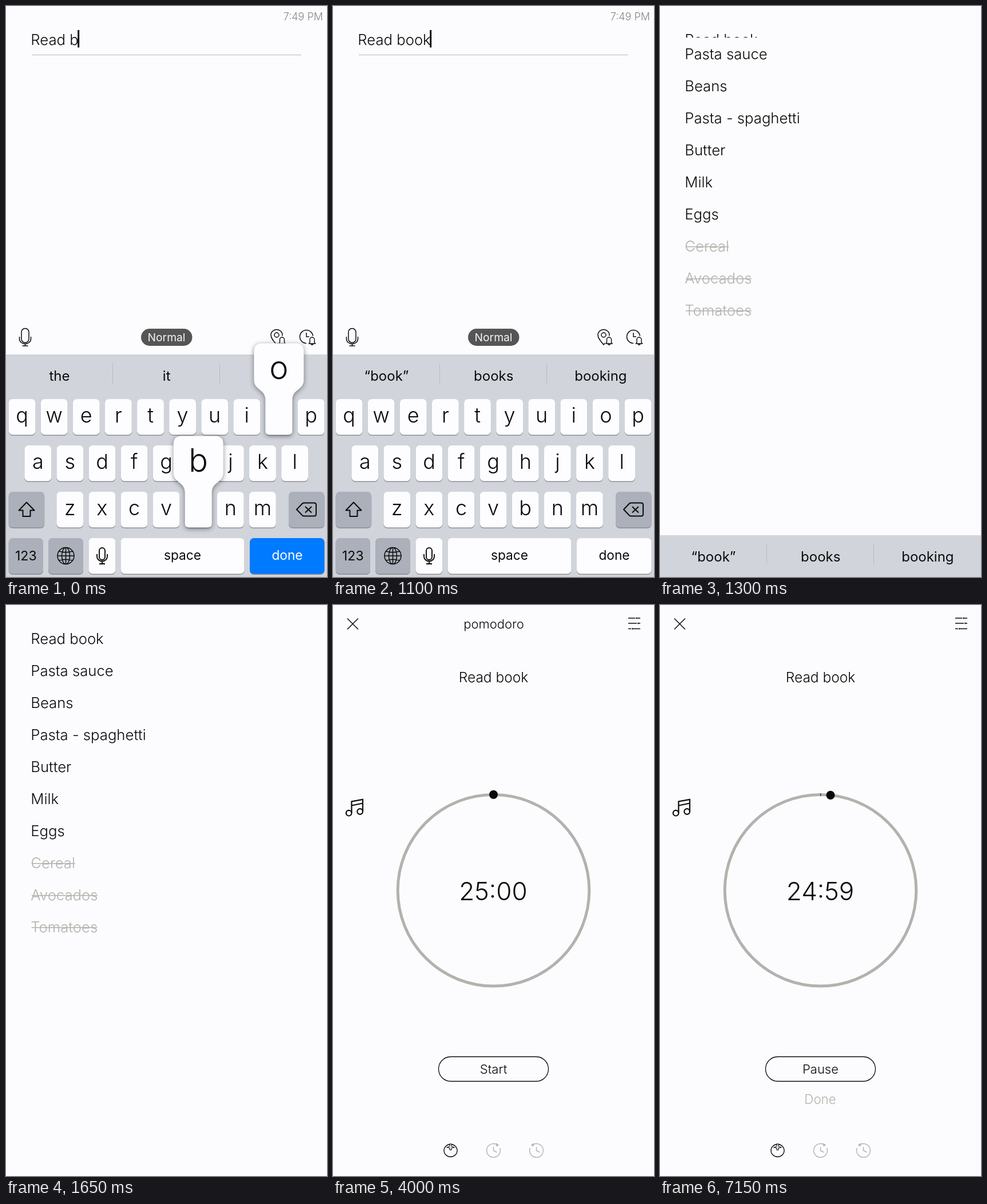
Write an HTML page with a canvas that moves like this. It is 561 px wide and 998 px high and loops after 7200 ms.

```html
<!DOCTYPE html>
<html lang="en">
<head>
<meta charset="utf-8">
<title>To-do list with timer</title>
<style>
  html, body { margin: 0; width: 100%; height: 100%; overflow: hidden; background: #fcfcfe; }
  canvas { display: block; }
</style>
</head>
<body>
<canvas id="stage" width="561" height="998"></canvas>
<script>
const ctx = document.getElementById('stage').getContext('2d');
const W = 561, H = 998, LOOP = 7200, STEP = 50;
const PAPER = '#fcfcfe', INK = '#0a0a0a', GREY = '#b2b2ae';

const clamp = v => Math.max(0, Math.min(1, v));
// Critically damped spring from 0 to 1.
const spring = (ms, rate) => {
  const x = Math.max(0, ms) / 1000 * rate;
  return 1 - Math.exp(-x) * (1 + x);
};

function text(str, x, y, size, { color = INK, weight = 300, align = 'center' } = {}) {
  ctx.font = `${weight} ${size}px Inter, sans-serif`;
  ctx.textAlign = align;
  ctx.fillStyle = color;
  ctx.fillText(str, x, y);
  return ctx.measureText(str).width;
}

function stroke(d, width = 1.5, color = INK, fill) {
  const path = new Path2D(d);
  if (fill) { ctx.fillStyle = fill; ctx.fill(path); }
  ctx.lineWidth = width;
  ctx.strokeStyle = color;
  ctx.stroke(path);
}

function box(x, y, w, h, r, fill) {
  ctx.beginPath();
  ctx.roundRect(x, y, w, h, r);
  ctx.fillStyle = fill;
  ctx.fill();
}

function at(x, y, draw) {
  ctx.save();
  ctx.translate(x, y);
  draw();
  ctx.restore();
}

function disc(x, y, r, color = INK) {
  ctx.beginPath();
  ctx.arc(x, y, r, 0, 2 * Math.PI);
  ctx.fillStyle = color;
  ctx.fill();
}

// ---- List ----
const items = ['Pasta sauce', 'Beans', 'Pasta - spaghetti', 'Butter', 'Milk', 'Eggs',
               'Cereal', 'Avocados', 'Tomatoes'];
const LEFT = 43.3, ROW = 56, FIRST_BASE = 68;
const itemText = (str, y, color = INK) =>
  text(str, LEFT, y, 25.7, { align: 'left', weight: 340, color });

function list(t) {
  const p = spring(t - 1200, 15.3), open = p > 0.99 ? 1 : p;
  ctx.fillStyle = PAPER;
  ctx.fillRect(0, 0, W, H);
  ctx.save();
  ctx.beginPath();
  ctx.rect(0, 0, W, 30 + ROW * open);
  ctx.clip();
  itemText('Read book', FIRST_BASE);
  ctx.restore();
  items.forEach((item, i) => {
    const y = Math.round(FIRST_BASE + ROW * (i + open)), done = i > 5;
    const w = itemText(item, y, done ? GREY : INK);
    if (done) {
      ctx.fillStyle = GREY;
      ctx.fillRect(LEFT + 1.5, y - 9, w - 2, 1.5);
    }
  });
}

// ---- Editor ----
function bell(x, y) {
  at(x, y, () => {
    disc(0, 0, 8.5, PAPER);
    stroke('M-5.5 5H5.5L4 2.5V-2A4 4 0 0 0 -4 -2V2.5ZM-1.8 5.5A1.8 1.8 0 0 0 1.8 5.5', 1.4);
  });
}

function editor(typed, alpha) {
  ctx.globalAlpha = alpha;
  ctx.fillStyle = PAPER;
  ctx.fillRect(0, 0, W, H);
  text('7:49 PM', 554, 25, 18, { align: 'right', color: '#858585' });
  const w = itemText(typed, FIRST_BASE);
  ctx.fillStyle = INK;
  ctx.fillRect(LEFT + w - 1.5, 42, 3, 30.5);
  ctx.fillStyle = '#b9b9bb';
  ctx.fillRect(45, 85, 471, 1);

  at(33.5, 579, () => stroke(
    'M-6.5 -9A6.5 6.5 0 0 1 6.5 -9V3A6.5 6.5 0 0 1 -6.5 3ZM-10 -1V3A10 8.5 0 0 0 10 3V-1M0 11.5V15M-5 15H5'));
  box(236, 564, 89.5, 30, 15, '#555');
  text('Normal', 280.5, 586, 19.3, { color: '#f4f4f4', weight: 400 });
  stroke('M473 592C468 586 463 581 463 575A10 9.5 0 0 1 483 575C483 581 478 586 473 592Z');
  stroke('M477 575A4 4 0 1 1 469 575A4 4 0 1 1 477 575');
  bell(482.5, 585);
  stroke('M536.5 578A11.5 11.5 0 1 0 525 589.5M525 571V578H530');
  bell(535, 585);
  ctx.globalAlpha = 1;
}

// ---- Keyboard ----
const KEY_W = 46.8, KEY_H = 62.5, PITCH = 56.1, DARK = '#abb0ba';
const rows = [['qwertyuiop', 4.7, 687], ['asdfghjkl', 32.4, 768], ['zxcvbnm', 88.4, 849]];

function key(x, y, w, fill = '#fdfdff') {
  box(x, y + 1.5, w, KEY_H, 7, '#8b8e94');
  box(x, y, w, KEY_H, 7, fill);
}

function popup(letter) {
  const [letters, x0, y] = rows.find(r => r[0].includes(letter));
  at(x0 + letters.indexOf(letter) * PITCH + KEY_W / 2, y - 97.5, () => {
    const shape = new Path2D('M-29 0H29Q43.5 0 43.5 14V64C43.5 82 23.5 80 23.5 99V153Q23.5 160 16.5 160' +
      'H-16.5Q-23.5 160 -23.5 153V99C-23.5 80 -43.5 82 -43.5 64V14Q-43.5 0 -29 0Z');
    ctx.shadowColor = 'rgba(0,0,0,.45)';
    ctx.shadowBlur = 9;
    ctx.shadowOffsetY = 2;
    ctx.fillStyle = '#fdfdff';
    ctx.fill(shape);
    ctx.shadowColor = 'transparent';
    text(letter, 0, 62.5, 56);
  });
}

function keyboard(words, pressed, donePressed) {
  ctx.fillStyle = '#d1d4db';
  ctx.fillRect(0, 609, W, H - 609);
  words.forEach((word, i) => text(word, 93.5 + 187.2 * i, 655, 24, { weight: 400 }));
  ctx.fillStyle = '#b8bbc2';
  ctx.fillRect(186, 624, 1, 36);
  ctx.fillRect(373, 624, 1, 36);

  for (const [letters, x0, y] of rows) {
    [...letters].forEach((c, i) => {
      key(x0 + i * PITCH, y, KEY_W);
      text(c, x0 + i * PITCH + KEY_W / 2, y + 40.5, 36);
    });
  }
  key(4.7, 849, 62.5, DARK);
  key(494, 849, 62.5, DARK);
  key(4.7, 930, 60.3, DARK);
  key(74, 930, 61, DARK);
  key(144.5, 930, KEY_W);
  key(200.5, 930, 216);
  key(426, 930, 130.5, donePressed ? '#fdfdff' : '#007aff');

  const label = { weight: 400 };
  text('123', 34.8, 969, 23, label);
  text('space', 308.5, 968, 22.7, label);
  text('done', 491.5, 968, 22.7, { weight: 400, color: donePressed ? INK : '#fff' });
  ctx.lineJoin = 'round';
  stroke('M36 867.5L22.5 881.5H29.5V892H42.5V881.5H49.5Z', 2);
  stroke('M508 880L518 869.5Q519 868.5 521 868.5H538.5Q542 868.5 542 872V888Q542 891.5 538.5 891.5' +
    'H521Q519 891.5 518 890.5ZM523 875L534 885.5M534 875L523 885.5', 2);
  at(104.5, 961, () => stroke(
    'M14.5 0A14.5 14.5 0 1 1 -14.5 0A14.5 14.5 0 1 1 14.5 0ZM7 0A7 14.5 0 1 1 -7 0A7 14.5 0 1 1 7 0Z' +
    'M0 -14.5V14.5M-14.5 0H14.5M-12 -8Q0 -4.5 12 -8M-12 8Q0 4.5 12 8', 1.5));
  at(168, 960, () => stroke(
    'M-5 -8A5 5 0 0 1 5 -8V3A5 5 0 0 1 -5 3ZM-9 -2V2A9 8.5 0 0 0 9 2V-2M0 10.5V15M-5 15H5', 1.9));
  ctx.lineJoin = 'miter';
  [...pressed].forEach(popup);
}

// ---- Timer ----
function clockIcon(x, flip) {
  at(x, 953.5, () => {
    stroke('M0 -6.5V0L6 3', 1.4, GREY);
    ctx.scale(flip, 1);
    stroke('M11 -4.5A11.9 11.9 0 1 1 5 -10.8', 1.4, GREY);
    stroke('M5 -12.5L9 -9.5L5.5 -7.5Z', 1, GREY, GREY);
  });
}

function timer(running, elapsed) {
  const ticked = running && elapsed >= 1000;
  ctx.fillStyle = PAPER;
  ctx.fillRect(0, 0, W, H);
  stroke('M25 23.5L44 42.5M44 23.5L25 42.5', 1.5);
  stroke('M516 23H528M530 23H537M516 32H531M533 32H537M516 41.5H521M523 41.5H537', 1.3);
  stroke('M530 21.5V24.5M533 30.5V33.5M523 40V43', 1.2);
  if (!running) text('pomodoro', 281, 41, 22);
  text('Read book', 280.5, 135, 24.5, { weight: 340 });

  stroke('M32.5 363V343.5L52 339.8V360.5M32.5 350.5L52 346.5', 2.2);
  stroke('M32.5 363.7A4.8 4.8 0 1 1 22.9 363.7A4.8 4.8 0 1 1 32.5 363.7Z' +
    'M52 361A4.8 4.8 0 1 1 42.4 361A4.8 4.8 0 1 1 52 361Z', 2.2);

  at(280.5, 498.8, () => {
    ctx.beginPath();
    ctx.arc(0, 0, 167.3, 0, 2 * Math.PI);
    ctx.lineWidth = 5;
    ctx.strokeStyle = GREY;
    ctx.stroke();
    if (ticked) {
      ctx.fillStyle = INK;
      ctx.fillRect(-0.3, -169.7, 1, 5);
    }
    // One turn of the dot per minute.
    const angle = running ? elapsed / 60000 * 2 * Math.PI : 0;
    disc(167.4 * Math.sin(angle), -167.4 * Math.cos(angle), 7.6);
  });
  text(ticked ? '24:59' : '25:00', 280, 515.5, 44);

  ctx.beginPath();
  ctx.roundRect(184.5, 789.5, 192, 43, 21.5);
  ctx.lineWidth = 1.3;
  ctx.strokeStyle = INK;
  ctx.stroke();
  text(running ? 'Pause' : 'Start', 280.5, 819.3, 22);
  if (ticked) text('Done', 280, 871.5, 22.3, { color: GREY });

  at(205.5, 953.5, () => {
    stroke('M11.5 0A11.5 11 0 1 1 -11.5 0A11.5 11 0 1 1 11.5 0Z', 1.4);
    stroke('M-1.5 -11.5H1.5V-7.5L6.5 -5.5L1.5 -4.5V-1H-1.5V-4.5L-6.5 -5.5L-1.5 -7.5Z', 1.1, INK, PAPER);
  });
  clockIcon(280.5, 1);
  clockIcon(355.5, -1);
}

// ---- Timeline ----
const typing = [
  [0, 'Read b', ['the', 'it', 'a']],
  [100, 'Read bo', ['“bo”', 'book', 'body']],
  [300, 'Read boo', ['“boo”', 'book', 'books']],
  [600, 'Read book', ['“book”', 'books', 'booking']]
];
const presses = [['o', 0, 150], ['b', 0, 50], ['o', 250, 400], ['k', 500, 650]];

function render(t) {
  if (t < 4000) list(t);
  if (t < 1650) {
    const [, typed, words] = typing.findLast(s => t >= s[0]);
    const pressed = presses.filter(([, from, to]) => t >= from && t < to).map(p => p[0]);
    if (t < 1300) editor(typed, clamp((1300 - t) / 200));
    const drop = Math.round((H - 609) * spring(t - 1125, 17.6));
    at(0, drop, () => keyboard(words, pressed, t >= 950));
  }
  if (t >= 3800) {
    const rise = 1 - (1 - clamp((t - 3750) / 250)) ** 3;
    at(0, H * (1 - rise), () => timer(t >= 6250, t - 6150));
  }
}

const start = performance.now();
function loop() {
  const t = (performance.now() - start + 1) % LOOP;
  render(Math.floor(t / STEP) * STEP);
  requestAnimationFrame(loop);
}
loop();
</script>
</body>
</html>
```
